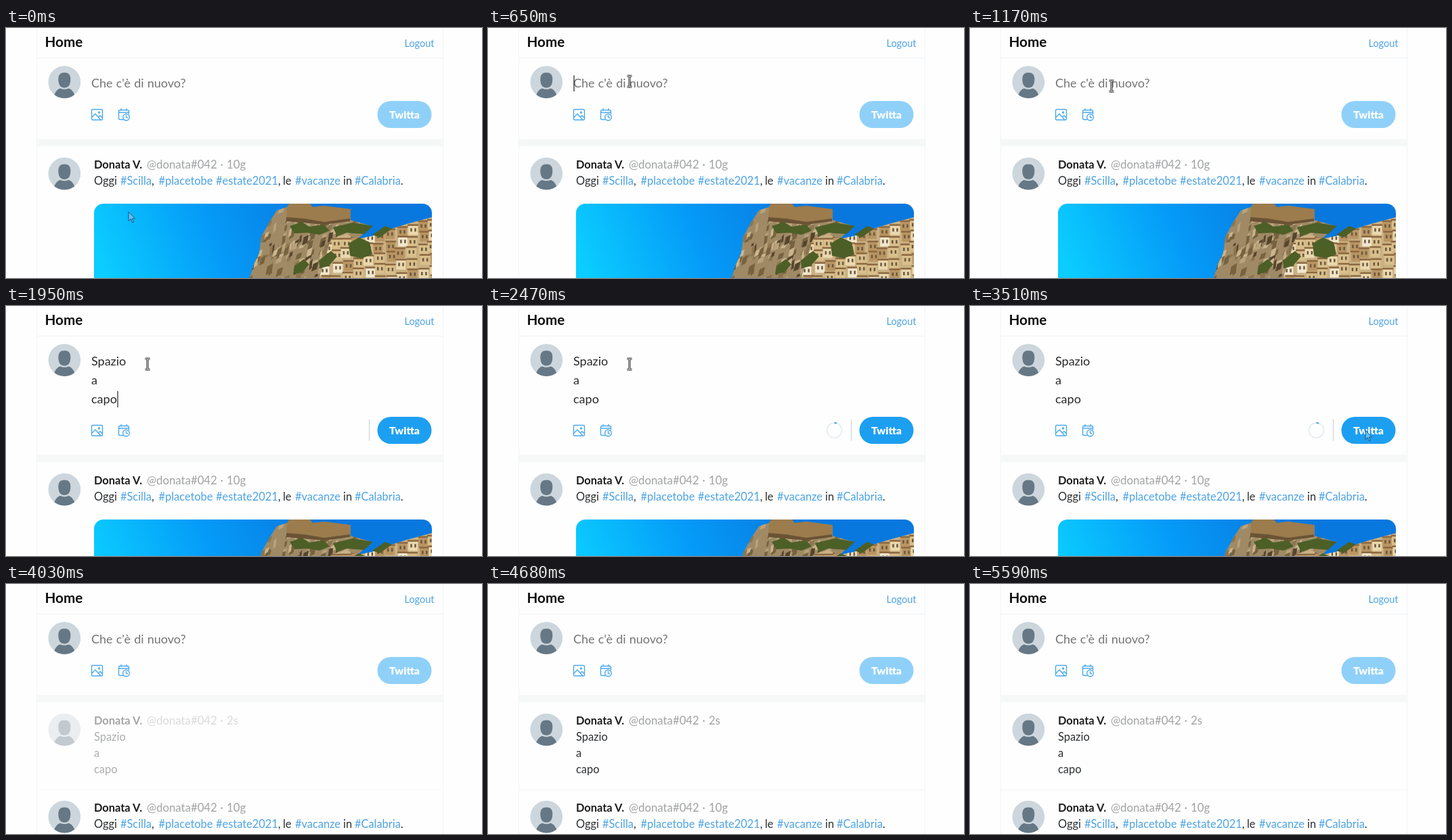
An HTML page for the animation above (5.72 s loop, 703x370 px).

```html
<!DOCTYPE html>
<html lang="it">
<head>
<meta charset="utf-8">
<title>Home</title>
<style>
  html, body { margin: 0; width: 100%; height: 100%; overflow: hidden; background: #fefefe; }
  svg { display: block; width: 703px; height: 370px; font-family: Lato, "Open Sans", sans-serif; }
  .line { stroke: #f0f4f5; }
  .name { font: 700 16.4px Lato, sans-serif; fill: #1c1c1c; }
  .meta { font-size: 16.8px; fill: #a0a2a3; }
  .body { font-size: 16.4px; fill: #2c2f31; }
  .tag { fill: #4da3e4; }
  .draft { font-size: 18px; word-spacing: .5px; fill: #2a2a2a; }
  .icon { fill: none; stroke: #4aa9ee; stroke-width: 1.4; stroke-linejoin: round; stroke-linecap: round; }
</style>
</head>
<body>
<svg viewBox="0 0 703 370">
  <defs>
    <clipPath id="disc"><circle r="24"/></clipPath>
    <clipPath id="frame"><rect x="130" y="260" width="499" height="280" rx="14"/></clipPath>
    <clipPath id="cliff"><path id="cliffShape" d="M359 372L366 350L374 333L377 309L389 287L400 270L415 265V282L508 284L540 293L520 312L506 330L470 372Z"/></clipPath>
    <clipPath id="town"><path id="townShape" d="M462 372L480 312L502 305L519 312L541 308L560 300L592 290L629 280V372Z"/></clipPath>
    <linearGradient id="sky" gradientUnits="userSpaceOnUse" x1="460" y1="250" x2="150" y2="375">
      <stop offset="0" stop-color="#0878de"/>
      <stop offset=".5" stop-color="#059bf8"/>
      <stop offset="1" stop-color="#0bcdff"/>
    </linearGradient>
    <g id="avatar" clip-path="url(#disc)">
      <circle r="24" fill="#ccd6dc"/>
      <path d="M-9 -4C-9 -11 -6 -14 0 -14S9 -11 9 -4C9 5 5 8.500 0 8.500S-9 5 -9 -4Z" fill="#667886"/>
      <path d="M-17 26C-15 15 -10 10 -6 9.500Q0 12 6 9.500C10 10 15 15 17 26Z" fill="#667886"/>
    </g>
  </defs>

  <rect width="703" height="370" fill="#fefefe"/>
  <path class="line" d="M45.500 0V370M645.500 0V370M46 44.500H645" fill="none"/>
  <text x="57.500" y="28" font-size="20.600" font-weight="700" fill="#0c0c0c">Home</text>
  <text class="tag" x="632.500" y="28" font-size="14.500" text-anchor="end">Logout</text>

  <use href="#avatar" x="86.300" y="80"/>
  <g id="draft" class="draft"></g>
  <path id="caret" stroke="#222" stroke-width="1.200"/>

  <g id="tools">
    <g class="icon">
      <rect x="126.500" y="120.500" width="16" height="15.500" rx="1.500"/>
      <path d="M127 132L132 127L139.500 135.500M136.500 132L139 129.500L142 132.500"/>
      <circle cx="137.500" cy="125" r="1"/>
      <path d="M173 135.500H168.500Q166.500 135.500 166.500 133.500V123.500Q166.500 121.500 168.500 121.500H179.500Q181.500 121.500 181.500 123.500V127M166.500 125H181.500M170 119.500V122M178 119.500V122"/>
      <circle cx="177.500" cy="132" r="4.800"/>
      <path d="M177.500 129.500V132.200L179.500 133"/>
    </g>
    <g id="ring" fill="none" stroke-width="2">
      <circle cx="511.500" cy="128" r="11" stroke="#e9eff2"/>
      <path d="M511.500 117A11 11 0 0 1 515.200 117.650" stroke="#39a7f1"/>
    </g>
    <path id="divider" d="M536.500 112V143.500" stroke="#c4cfda"/>
    <rect id="pill" x="548.500" y="108" width="80" height="40" rx="20"/>
    <text x="588.500" y="133.700" font-size="15.800" font-weight="900" fill="#fff" text-anchor="middle">Twitta</text>
    <rect x="46" y="164" width="599" height="11" fill="#f6f8f8"/>
  </g>

  <g id="fresh"></g>
  <g id="old">
    <g id="post"></g>
    <g clip-path="url(#frame)">
      <rect x="130" y="260" width="499" height="280" fill="url(#sky)"/>
      <use href="#cliffShape" fill="#a08a66"/>
      <g id="stones" clip-path="url(#cliff)"></g>
      <use href="#townShape" fill="#c9b184"/>
      <g id="houses" clip-path="url(#town)"></g>
      <path d="M415 265L418 260H449L453 265L470 263L509 268V286L470 290L440 286L414 284Z" fill="#9c7c4c"/>
      <path d="M414 280L440 282L470 287L508 282V286L470 291L414 286Z" fill="#6a5335"/>
      <path d="M419 293L437 287L448 294L470 291L478 300L463 306L446 303L426 304ZM483 295L512 288L542 293L529 305L503 303L489 308ZM426 352L440 342L448 350L437 362L424 364ZM462 344L480 330L489 338L477 352L463 356ZM506 319L521 310L537 317L541 335L525 341L508 337ZM541 306L560 293L570 297L552 310Z" fill="#4c5f27"/>
    </g>
  </g>

  <path id="arrow" d="M0 0V13.500L3.300 10.600L5.600 16L7.600 15.100L5.400 10H9.500Z" fill="#5cc4fb" stroke="#2a5078" stroke-width="1"/>
  <g id="beam" fill="none">
    <path d="M-3.500 -8H-1L0 -7.500L1 -8H3.500M0 -7.500V7.500M-3.500 8H-1L0 7.500L1 8H3.500" stroke="#3a3a3a" stroke-width="3.200"/>
    <path d="M-3.500 -8H-1L0 -7.500L1 -8H3.500M0 -7.500V7.500M-3.500 8H-1L0 7.500L1 8H3.500" stroke="#eee" stroke-width="1"/>
  </g>
</svg>

<script>
const LOOP = 5720, STEP = 130;
const PASTE = 1950, SEND = 3640, FADE = 1000;
const lines = ["Spazio", "a", "capo"];
const $ = id => document.getElementById(id);
const show = (id, on) => $(id).setAttribute("visibility", on ? "visible" : "hidden");
const shift = (id, x, y) => $(id).setAttribute("transform", `translate(${x} ${y})`);
const text = (x, y, s, cls = "") => `<text class="${cls}" x="${x}" y="${y}">${s}</text>`;

const header = age =>
  `<use href="#avatar" x="86.3" y="215.5"/>` +
  text(130, 208, "Donata V.", "name") +
  text(208, 208, "@donata#042", "meta") +
  text(316.5, 208, "·", "meta") + text(326, 208, age, "meta");

// x, word, punctuation after it
const words = [
  [130, "Oggi", ""], [169, "#Scilla", ","], [225.5, "#placetobe", ""], [310, "#estate2021", ","],
  [409, "le", ""], [427, "#vacanze", ""], [498, "in", ""], [515, "#Calabria", "."]
];
$("post").innerHTML = header("10g") + words.map(([x, w, end]) =>
  text(x, 232, w[0] === "#" ? `<tspan class="tag">${w}</tspan>${end}` : w, "body")).join("");
$("fresh").innerHTML = header("2s") +
  lines.map((s, i) => text(130, 232 + 24 * i, s, "body")).join("") +
  `<path class="line" d="M46 304.5H645"/>`;

let seed = 7;
const rand = () => (seed = seed * 16807 % 2147483647) / 2147483647;
const pick = list => list[Math.floor(rand() * list.length)];

// slanted chips of light and shade on the cliff
function chip() {
  const x = 358 + rand() * 170, y = 262 + rand() * 108;
  const w = 3 + rand() * 6, h = 4 + rand() * 11;
  const fill = pick(["#c9b48c", "#b9a37c", "#77623f", "#56452c", "#8c7550"]);
  return `<path d="M${x} ${y}l${w} ${-h / 3}l${-w / 3} ${h}l${-w} ${h / 3}Z" fill="${fill}"/>`;
}
$("stones").innerHTML = Array.from({ length: 210 }, chip).join("");

// stepped rows of walls, each with a roof and a window
function house(i) {
  const col = i % 11, row = Math.floor(i / 11);
  const x = 462 + col * 16 + rand() * 6, y = 316 + row * 17 - col * 3.5 + rand() * 5;
  const wall = pick(["#ead9ae", "#d9bf8a", "#f0e6cb", "#b99562"]);
  const box = (dx, dy, w, h, fill) =>
    `<rect x="${x + dx}" y="${y + dy}" width="${w}" height="${h}" fill="${fill}"/>`;
  return box(0, 0, 14, 14, wall) + box(-1, -2, 16, 2.5, "#8c6741") +
    box(3, 4, 2.5, 5, "#6b5740") + box(9, 4, 2.5, 5, "#6b5740");
}
$("houses").innerHTML = Array.from({ length: 66 }, (_, i) => house(i)).join("");

const drafts = {
  empty: `<text x="126" y="88" fill="#747474">Che c'è di nuovo?</text>`,
  full: lines.map((s, i) => text(126, 88 + 28 * i, s)).join("")
};

// time, x, y of the pointer
const path = [
  [0, 181, 272], [130, 183, 254], [520, 208, 86], [650, 209, 79], [780, 209, 80],
  [1170, 209, 86], [2730, 209, 86], [2990, 453, 138], [3250, 578, 180], [3510, 584, 184]
];

function pointer(t) {
  const i = path.findIndex(p => p[0] > t);
  if (i < 0) return path[path.length - 1].slice(1);
  const [a, b] = [path[i - 1], path[i]];
  const k = (t - a[0]) / (b[0] - a[0]);
  return [a[1] + (b[1] - a[1]) * k, a[2] + (b[2] - a[2]) * k];
}

let current;
function setDraft(kind) {
  if (kind !== current) $("draft").innerHTML = drafts[current = kind];
}

const between = (t, a, b) => t >= a && t < b;

function draw(time) {
  const t = Math.floor((time % LOOP) / STEP) * STEP;
  const typed = between(t, PASTE, SEND);
  const sent = t >= SEND;
  const grow = typed ? 56 : 0;

  setDraft(typed ? "full" : "empty");
  shift("tools", 0, grow);
  shift("old", 0, sent ? 129 : grow);
  $("pill").setAttribute("fill", typed ? "#1d9ff1" : "#8fd0f9");
  show("divider", typed);
  show("ring", typed && t > PASTE);

  $("caret").setAttribute("d", typed ? "M165 126V150" : "M127 70V94");
  show("caret", between(t, 650, 1170) || between(t, 1820, 2470) || between(t, 3120, 3380));

  show("fresh", sent);
  $("fresh").setAttribute("opacity", Math.max(0, Math.min(1, (t - SEND) / FADE)));

  const [x, y] = pointer(t);
  const overField = between(t, 390, 3120);
  shift("arrow", x, y);
  shift("beam", x, y);
  show("arrow", !overField && !sent);
  show("beam", overField);
}

const start = performance.now();
function tick() {
  draw(performance.now() - start);
  requestAnimationFrame(tick);
}
tick();
</script>
</body>
</html>
```
